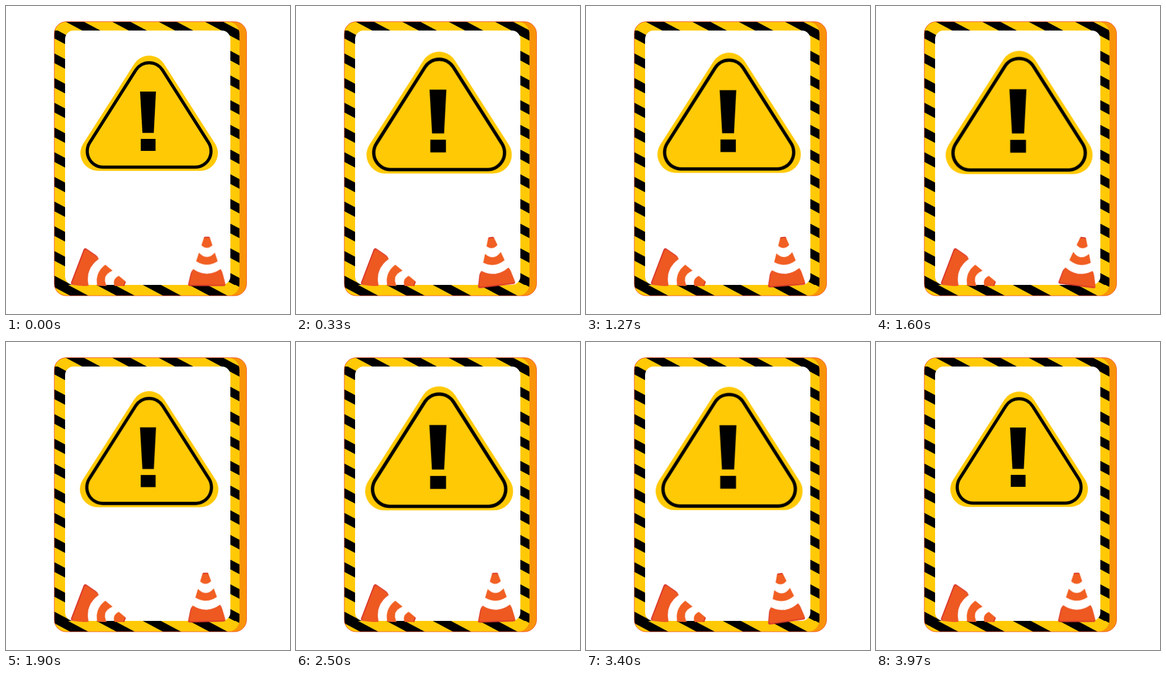
These frames come from a looping animation (500x540 px, 4000 ms). An HTML page:

```html
<!DOCTYPE html>
<html lang="en">
<head>
<meta charset="utf-8">
<title>Warning sign</title>
<style>
  html, body { margin: 0; width: 100%; height: 100%; overflow: hidden; background: #fff; }
  svg { display: block; width: 500px; height: 540px; }

  .yellow { fill: #ffc905; }
  .orange { fill: #f15f22; }
  .rim { fill: #d9372b; }
  .stripes { fill: none; stroke: #000; }
  .side { stroke-dasharray: 17 26.3; }
  .flat { stroke-dasharray: 32 49.7; }

  .sign {
    transform-origin: 252px 208px;
    animation: pulse .5s cubic-bezier(.37, 0, .63, 1) infinite alternate;
  }
  @keyframes pulse { to { transform: scale(1.076); } }

  .wobble { animation: wobble 1s linear infinite; }
  @keyframes wobble {
    0% { transform: rotate(0deg); }
    7% { transform: rotate(.8deg); }
    15% { transform: rotate(-.8deg); }
    27% { transform: rotate(-4.5deg); }
    35% { transform: rotate(-7.8deg); }
    40% { transform: rotate(-8.4deg); }
    45% { transform: rotate(-6.5deg); }
    50% { transform: rotate(-2.4deg); }
    56% { transform: rotate(5deg); }
    60% { transform: rotate(7.5deg); }
    67% { transform: rotate(2deg); }
    74% { transform: rotate(-2.6deg); }
    80% { transform: rotate(-4deg); }
    90% { transform: rotate(-1.8deg); }
    97% { transform: rotate(-.3deg); }
    100% { transform: rotate(0deg); }
  }
</style>
</head>
<body>
<svg viewBox="0 0 500 540">
  <defs>
    <clipPath id="front"><rect x="85" y="27.5" width="326" height="480.5" rx="21"/></clipPath>
    <clipPath id="floor"><rect x="100" y="400" width="130" height="91"/></clipPath>

    <!-- Cone with its origin at the middle of the base -->
    <g id="cone">
      <path class="rim" d="M-33 -3L-28.500 -22Q-27.500 -26 -24 -29Q0 -13 24 -29Q26.500 -26 27.500 -22L32.500 -3Q33 .5 29 .5H-29Q-33.500 .5 -33 -3z"/>
      <path fill="#ee5821" d="M-31 -5L-27 -22Q-26.500 -26 -24 -29Q0 -13 24 -29Q26.500 -26 27.500 -22L32 -5Q32 -1.500 28 -1.500H-27Q-31.500 -1.500 -31 -5z"/>
      <path class="orange" d="M-14 -58Q0 -43 14 -58L19 -43Q0 -31 -19 -43z"/>
      <path class="orange" d="M-5.500 -83.500Q-5 -86 -3 -86H3Q5 -86 5.500 -83.500L9.700 -71Q0 -62 -9.700 -71z"/>
      <path class="rim" d="M-5.500 -83.500Q-5 -86 -3 -86H3Q5 -86 5.500 -83.500Q0 -85 -5.500 -83.500z"/>
    </g>
  </defs>

  <rect x="85" y="27.500" width="338.500" height="480.500" rx="21" fill="#f99408"/>
  <g clip-path="url(#front)">
    <rect class="yellow" x="85" y="27" width="326" height="481"/>
    <path class="stripes side" stroke-width="34" transform="translate(85 39.700) skewY(27.900)" d="M17 -43.300V450"/>
    <path class="stripes side" stroke-width="31" transform="translate(395 35.200) skewY(27.900)" d="M.5 -43.300V460"/>
    <path class="yellow" d="M85 27H411V43H85zM85 489H411V508H85z"/>
    <path class="stripes flat" stroke-width="16" transform="translate(104 27) skewX(62.100)" d="M-81.700 8H400"/>
    <path class="stripes flat" stroke-width="19" transform="translate(159 489) skewX(62.100)" d="M-163.400 9.500H300"/>
  </g>
  <rect x="85" y="27.500" width="338.500" height="480.500" rx="21" fill="none" stroke="#ee3a1c" stroke-width=".8"/>
  <rect x="104" y="43" width="291" height="446" rx="15" fill="#fff"/>

  <g class="sign">
    <path d="M162 258H342L252 118z" class="yellow" stroke="#ffc905" stroke-width="62" stroke-linejoin="round"/>
    <path d="M171 282.500H333A28 28 0 0 0 356.600 239.500L275.600 112.500A28 28 0 0 0 228.400 112.500L147.400 239.500A28 28 0 0 0 171 282.500z" fill="none" stroke="#000" stroke-width="5.500"/>
    <path d="M236 150H264L260.200 222.500H240.200zM237.300 233H263.300V254H237.300z"/>
  </g>

  <g clip-path="url(#floor)">
    <use href="#cone" transform="translate(126 456) rotate(111) scale(1.040)"/>
  </g>
  <g transform="translate(353.700 490.500)">
    <g class="wobble"><use href="#cone"/></g>
  </g>
</svg>
</body>
</html>
```
